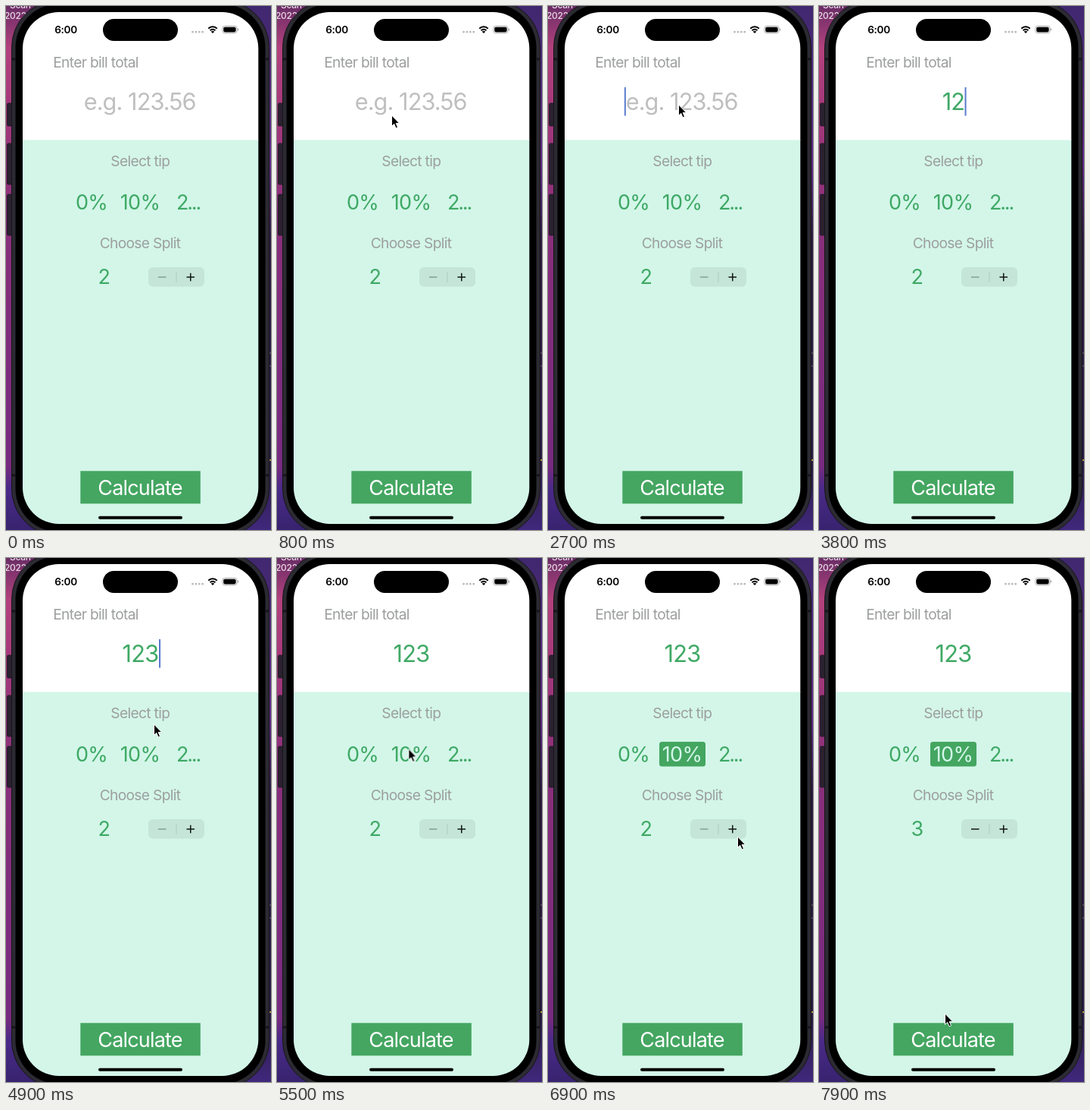
Recreate the animation shown at these times as an HTML page. Size 350 px wide and 690 px high, loop 8000 ms.

```html
<!DOCTYPE html>
<html lang="en">
<head>
<meta charset="utf-8">
<title>Tip calculator</title>
<style>
  html, body { margin: 0; width: 350px; height: 690px; overflow: hidden; background: #000; }
  svg { display: block; }
  text { font-family: Inter, Roboto, sans-serif; letter-spacing: -.025em; text-anchor: middle; }

  .label { font-size: 19.2px; letter-spacing: -.035em; fill: #9c9f9e; }
  .bill { font-size: 30.7px; fill: #3fa965; }
  .hint { letter-spacing: -.03em; fill: #bfbfc1; }
  .value { font-size: 27px; fill: #3fa965; }
  .cut { letter-spacing: -.08em; }
  .button { font-size: 27px; letter-spacing: -.03em; fill: #fff; }
  .clock { font-size: 13.6px; font-weight: 600; }
  .desk { font-size: 12px; font-weight: 500; fill: #e6dbe6; text-anchor: start; }

  /* One loop is 8 s, so 1.25% is a tenth of a second. */
  .anim { animation: 8s step-end infinite; }
  .hint { animation-name: hint; }
  .one { animation-name: one; }
  .two { animation-name: two; }
  .three { animation-name: three; }
  .caret { animation-name: blink, caret-move; }
  .pick { animation-name: pick; }
  .ten { animation-name: ten; }
  .split-2 { animation-name: split-2; }
  .split-3 { animation-name: split-3; }
  .minus { animation-name: minus; }
  .arrow { animation-name: arrow; }
  .pointer { animation: move 8s infinite; }

  @keyframes hint { 0% { opacity: 1 } 42.5%, 100% { opacity: 0 } }
  @keyframes one { 0% { opacity: 0 } 42.5% { opacity: 1 } 47.5%, 100% { opacity: 0 } }
  @keyframes two { 0% { opacity: 0 } 47.5% { opacity: 1 } 51.25%, 100% { opacity: 0 } }
  @keyframes three { 0% { opacity: 0 } 51.25%, 100% { opacity: 1 } }

  @keyframes blink {
    0% { opacity: 0 }
    25% { opacity: 1 }
    27.5% { opacity: 0 }
    33.75% { opacity: 1 }
    37.5% { opacity: .5 }
    38.75% { opacity: .2 }
    40% { opacity: 0 }
    42.5% { opacity: 1 }
    55% { opacity: .5 }
    56.25% { opacity: 0 }
    60% { opacity: .5 }
    61.25% { opacity: 1 }
    67.5%, 100% { opacity: 0 }
  }
  @keyframes caret-move {
    0% { transform: translateX(101.8px) }
    42.5% { transform: translateX(184px) }
    47.5% { transform: translateX(193.5px) }
    51.25%, 100% { transform: translateX(203px) }
  }

  @keyframes pick { 0% { opacity: 0 } 75%, 100% { opacity: 1 } }
  @keyframes ten {
    0% { fill: #3fa965; opacity: 1 }
    72.5% { fill: #3fa965; opacity: .5 }
    73.75% { fill: #3fa965; opacity: .25 }
    75% { fill: #d3f6e9; opacity: .22 }
    76.25% { fill: #d3f6e9; opacity: .45 }
    77.5% { fill: #d3f6e9; opacity: .75 }
    78.75%, 100% { fill: #d3f6e9; opacity: 1 }
  }
  @keyframes split-2 { 0% { opacity: 1 } 90%, 100% { opacity: 0 } }
  @keyframes split-3 { 0% { opacity: 0 } 90%, 100% { opacity: 1 } }
  @keyframes minus { 0% { stroke: #82a093 } 90%, 100% { stroke: #101513 } }

  @keyframes arrow { 0% { opacity: 1 } 42.5% { opacity: 0 } 53.75%, 100% { opacity: 1 } }
  @keyframes move {
    0%, 1.25% { transform: translate(354px, 330px); animation-timing-function: steps(3) }
    5% { transform: translate(230px, 215px); animation-timing-function: steps(4) }
    10% { transform: translate(152px, 144px) }
    18.75% { transform: translate(152px, 144px); animation-timing-function: steps(2) }
    21.25% { transform: translate(177px, 134px) }
    23.75% { transform: translate(177px, 134px); animation-timing-function: steps(1) }
    25% { transform: translate(173px, 130px) }
    53.75% { transform: translate(173px, 130px); animation-timing-function: steps(3) }
    57.5% { transform: translate(162px, 165px); animation-timing-function: steps(3) }
    61.25% { transform: translate(196px, 219px) }
    62.5% { transform: translate(196px, 219px); animation-timing-function: steps(6) }
    70% { transform: translate(170px, 258px) }
    77.5% { transform: translate(170px, 258px); animation-timing-function: steps(7) }
    86.25% { transform: translate(251px, 367px); animation-timing-function: steps(2) }
    88.75% { transform: translate(246px, 357px) }
    91.25% { transform: translate(246px, 357px); animation-timing-function: steps(2) }
    93.75% { transform: translate(192px, 519px); animation-timing-function: steps(1) }
    95% { transform: translate(188px, 543px) }
    96.25% { transform: translate(188px, 543px); animation-timing-function: steps(2) }
    98.75%, 100% { transform: translate(167px, 600px) }
  }
</style>
</head>
<body>
<svg width="350" height="690" viewBox="0 0 350 690">
  <defs>
    <linearGradient id="left" x2="0" y2="1">
      <stop offset="0" stop-color="#6a2d66"/>
      <stop offset=".08" stop-color="#b3417d"/>
      <stop offset=".2" stop-color="#a5387b"/>
      <stop offset=".4" stop-color="#8a2f7a"/>
      <stop offset=".88" stop-color="#772a80"/>
      <stop offset=".92" stop-color="#4a2a88"/>
      <stop offset="1" stop-color="#38236f"/>
    </linearGradient>
    <linearGradient id="right" x2="0" y2="1">
      <stop offset="0" stop-color="#40286f"/>
      <stop offset=".3" stop-color="#5f2a86"/>
      <stop offset=".45" stop-color="#2e1d42"/>
      <stop offset=".88" stop-color="#2b1d48"/>
      <stop offset="1" stop-color="#40287c"/>
    </linearGradient>
    <clipPath id="screen"><rect x="22" y="8" width="311.300" height="674" rx="48"/></clipPath>
  </defs>

  <!-- Desktop -->
  <rect width="175" height="690" fill="url(#left)"/>
  <rect x="175" width="175" height="690" fill="url(#right)"/>
  <text class="desk" x="5" y="3">Scan</text>
  <text class="desk" x="-2" y="17">2022</text>
  <path d="M348 457h2M348 474h2" stroke="#77726a"/>
  <path d="M348 598h2" stroke="#b59a3c" stroke-width="2"/>

  <!-- Phone -->
  <g fill="#2a2130" stroke="#17121c" stroke-width=".7">
    <rect x="1.500" y="128" width="7" height="30" rx="1.500"/>
    <rect x="1.500" y="181" width="7" height="54" rx="1.500"/>
    <rect x="1.500" y="248" width="7" height="54" rx="1.500"/>
  </g>
  <rect x="7.500" y="-7.500" width="340" height="705" rx="62" fill="#2c2a32" stroke="#16141a"/>
  <rect x="12.500" y="-2.500" width="330" height="695" rx="57"/>
  <path d="M8 70h4.500M343 70h4.500M8 618h4.500M343 618h4.500" stroke="#17151b" stroke-width="3"/>
  <g clip-path="url(#screen)">
    <rect x="22" y="8" width="312" height="169" fill="#fff"/>
    <rect x="22" y="176.500" width="312" height="506" fill="#d3f6e9"/>
  </g>

  <!-- Status bar -->
  <text class="clock" x="79" y="36">6:00</text>
  <rect x="128" y="17" width="99" height="29" rx="14.500"/>
  <path d="M246.500 34.200h14" stroke="#b9b9bb" stroke-width="2.800" stroke-linecap="round" stroke-dasharray="0 4.400"/>
  <path d="M267.300 29.700a8 8 0 0 1 11.400 0M269.600 32.200a4.800 4.800 0 0 1 6.800 0" fill="none" stroke="#000" stroke-width="2"/>
  <path d="M273 36l-2.200-2.300a3.200 3.200 0 0 1 4.400 0z"/>
  <rect x="285.800" y="26.400" width="19.200" height="9.400" rx="3" fill="none" stroke="#a5a5a7" stroke-width=".9"/>
  <rect x="287.200" y="27.800" width="16.400" height="6.600" rx="1.800"/>
  <path d="M306.400 29.600v3" stroke="#a5a5a7" stroke-width="1.200"/>

  <!-- Bill -->
  <text class="label" x="118.500" y="81.300">Enter bill total</text>
  <text class="bill hint anim" x="176.700" y="137.300">e.g. 123.56</text>
  <text class="bill one anim" x="177.500" y="137.300">1</text>
  <text class="bill two anim" x="177.500" y="137.300">12</text>
  <text class="bill three anim" x="177.500" y="137.300">123</text>
  <rect class="caret anim" x="-.8" y="107" width="1.700" height="37.500" fill="#3d63c4"/>

  <!-- Tip -->
  <text class="label" x="177.300" y="211">Select tip</text>
  <rect class="pick anim" x="147" y="242" width="61" height="32.500" rx="3.500" fill="#44a661"/>
  <text class="value" x="113" y="268.300">0%</text>
  <text class="value ten anim" x="177" y="268.300">10%</text>
  <text class="value cut" x="240.500" y="268.300">2...</text>

  <!-- Split -->
  <text class="label" x="177" y="318.700">Choose Split</text>
  <text class="value split-2 anim" x="129.500" y="366">2</text>
  <text class="value split-3 anim" x="129.500" y="366">3</text>
  <rect x="188" y="344" width="74" height="25.500" rx="6" fill="#c4e5d8"/>
  <path d="M225 350.500v13" stroke="#a9cbbd"/>
  <g fill="none" stroke-width="1.500">
    <path class="minus anim" d="M201 357h10.500"/>
    <path d="M238.500 357h10.500M243.750 351.750v10.500" stroke="#101513"/>
  </g>

  <!-- Result -->
  <rect x="98.300" y="612.300" width="158.500" height="43" fill="#44a661"/>
  <text class="button" x="177" y="643.700">Calculate</text>
  <rect x="122" y="671.700" width="111" height="4" rx="2"/>

  <g class="pointer">
    <path class="arrow anim" d="M-.5 0V14.300L2.700 11.300 5 16.800 7.500 15.800 5.200 10.400H9.700Z" stroke="#fff" stroke-linejoin="round"/>
  </g>
</svg>
</body>
</html>
```
